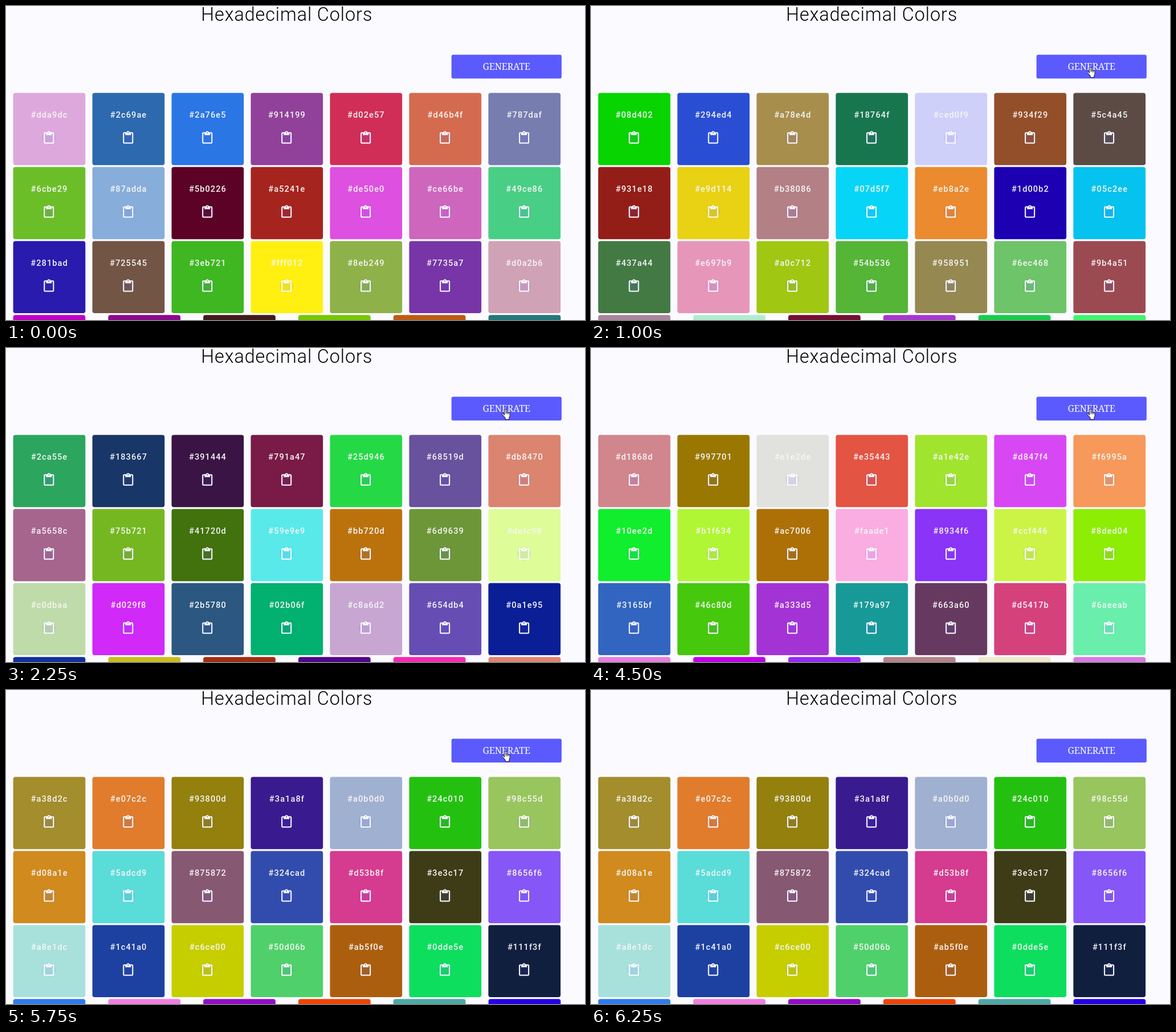
An HTML page for the animation above (6750 ms loop, 1016 by 551 pixels).

```html
<!DOCTYPE html>
<html lang="en">
<head>
<meta charset="utf-8">
<title>Hexadecimal Colors</title>
<style>
  html, body { margin: 0; width: 100%; height: 100%; overflow: hidden; background: #fbfbff; }
  svg { display: block; }
  .title { font: 300 32.4px Roboto, sans-serif; letter-spacing: .9px; }
  .button { font: 16px "Noto Serif", serif; letter-spacing: -.1px; fill: #fff; text-anchor: middle; }
  .label { font: 500 14.6px Roboto, sans-serif; letter-spacing: 1.05px; fill: #f5f5f5; text-anchor: middle; }
  .cursor { fill: #fff; stroke: #000; stroke-linejoin: round; }
</style>
</head>
<body>
<svg width="1016" height="551" viewBox="0 0 1016 551">
  <defs>
    <g id="paste">
      <circle cx="12" cy="11.5" r="12" fill="#5a5aff" opacity=".1"/>
      <path fill="#fff" d="M19 2h-4.18C14.4.84 13.3 0 12 0c-1.3 0-2.4.84-2.82 2H5c-1.1 0-2 .9-2 2v16c0 1.1.9 2 2 2h14c1.1 0 2-.9 2-2V4c0-1.1-.9-2-2-2zm-7 0c.55 0 1 .45 1 1s-.45 1-1 1-1-.45-1-1 .45-1 1-1zm7 18H5V4h2v3h10V4h2v16z"/>
    </g>
    <path id="arrow" d="M.5 .5V14L3.6 11.2 5.7 16.3 7.8 15.4 5.7 10.5H9.5z"/>
    <g id="hand" transform="scale(.9)">
      <path d="M5.5 13V2.5a1.5 1.5 0 0 1 3 0V8a1.4 1.4 0 0 1 2.8 .4a1.3 1.3 0 0 1 2.6 .6a1.2 1.2 0 0 1 2.4 .8V14c0 2-1.5 3-1.5 5v2.5H7.5V19C6.5 17 3.5 14 1.2 11.8C.3 10.3 2 9.3 3 10.3z"/>
      <path d="M8.5 8v3M11.3 8.4v3M13.9 9v2.5"/>
    </g>
  </defs>
  <text class="title" x="342.3" y="25.5">Hexadecimal Colors</text>
  <rect x="781.7" y="85.4" width="193.2" height="41.8" rx="3" fill="#5a5aff"/>
  <text class="button" x="878.2" y="111.7">GENERATE</text>
  <g id="tiles"></g>
  <use id="cursor" class="cursor"/>
</svg>
<script>
const LOOP = 6750, COLUMNS = 7, LABELLED = 21;

// Three rows of labelled swatches, then the cut-off bottom row
const palettes = [
  [0, `dda9dc 2c69ae 2a76e5 914199 d02e57 d46b4f 787daf
       6cbe29 87adda 5b0226 a5241e de50e0 ce66be 49ce86
       281bad 725545 3eb721 fff012 8eb249 7735a7 d0a2b6
       c000c8 8b0a8b 431a1a 76c800 bd5a14 247878`],
  [1000, `08d402 294ed4 a78e4d 18764f ced0f9 934f29 5c4a45
          931e18 e9d114 b38086 07d5f7 eb8a2e 1d00b2 05c2ee
          437a44 e697b9 a0c712 54b536 958951 6ec468 9b4a51
          a9869c b1eccf 720f33 a637cf 19cc4d 3ef56b`],
  [2250, `2ca55e 183667 391444 791a47 25d946 68519d db8470
          a5658c 75b721 41720d 59e9e9 bb720d 6d9639 defc98
          c0dbaa d029f8 2b5780 02b06f c8a6d2 654db4 0a1e95
          10319b cbbd20 a12e12 520587 f42ab0 de8470`],
  [3500, `bc02cb af68b4 49d919 d629b6 1548a1 bced45 ea33a8
          51c169 ec655d c7778c bc9147 8a3f7c 810dbc 708530
          b298a2 fd0b6d ec2111 c133ac 4b3a2e e232cb 40caac
          8f68a2 6fb1fb 68f093 20c410 30e6d8 d3a66c`],
  [4500, `d1868d 997701 e1e2de e35443 a1e42e d847f4 f6995a
          10ee2d b1f634 ac7006 faade1 8934f6 ccf446 8ded04
          3165bf 46c80d a333d5 179a97 663a60 d5417b 6aeeab
          e67fe0 c000e6 9528f8 b58287 f2e8cf d67be0`],
  [5750, `a38d2c e07c2c 93800d 3a1a8f a0b0d0 24c010 98c55d
          d08a1e 5adcd9 875872 324cad d53b8f 3e3c17 8656f6
          a8e1dc 1c41a0 c6ce00 50d06b ab5f0e 0dde5e 111f3f
          2f7bee f07fe0 930dc8 f04404 4caaa4 2500e8`],
];

const cursorSteps = [
  [0, "", 0, 0],
  [250, "#arrow", 958, 234],
  [500, "#arrow", 871, 128],
  [750, "#hand", 869.5, 106],
  [6000, "#arrow", 1003, 255],
  [6250, "", 0, 0],
];

const tiles = document.getElementById("tiles");
const cursor = document.getElementById("cursor");

function tile(hex, i) {
  const labelled = i < LABELLED;
  const column = labelled ? i % COLUMNS : i - LABELLED;
  const x = 12.6 + column * (labelled ? 138.97 : 166.8);
  const y = 152.6 + Math.floor(i / COLUMNS) * 129.9;
  const box = `<rect x="${x}" y="${y}" width="126.7" height="126.7" rx="4" fill="#${hex}"/>`;
  if (!labelled) return box;
  return box + `<text class="label" x="${x + 63.4}" y="${y + 43.3}">#${hex}</text>
    <use href="#paste" x="${x + 50.7}" y="${y + 67}"/>`;
}

const stepAt = (steps, t) => steps.findLast(([start]) => start <= t);

let shownPalette, shownCursor;
function draw(t) {
  const palette = stepAt(palettes, t), pointer = stepAt(cursorSteps, t);
  if (palette !== shownPalette) {
    tiles.innerHTML = palette[1].split(/\s+/).map(tile).join("");
    shownPalette = palette;
  }
  if (pointer !== shownCursor) {
    const [, shape, x, y] = pointer;
    cursor.style.display = shape ? "" : "none";
    if (shape) cursor.setAttribute("href", shape);
    cursor.setAttribute("x", x);
    cursor.setAttribute("y", y);
    shownCursor = pointer;
  }
}

const start = performance.now();
function tick() {
  draw((performance.now() - start) % LOOP);
  requestAnimationFrame(tick);
}
tick();
</script>
</body>
</html>
```
